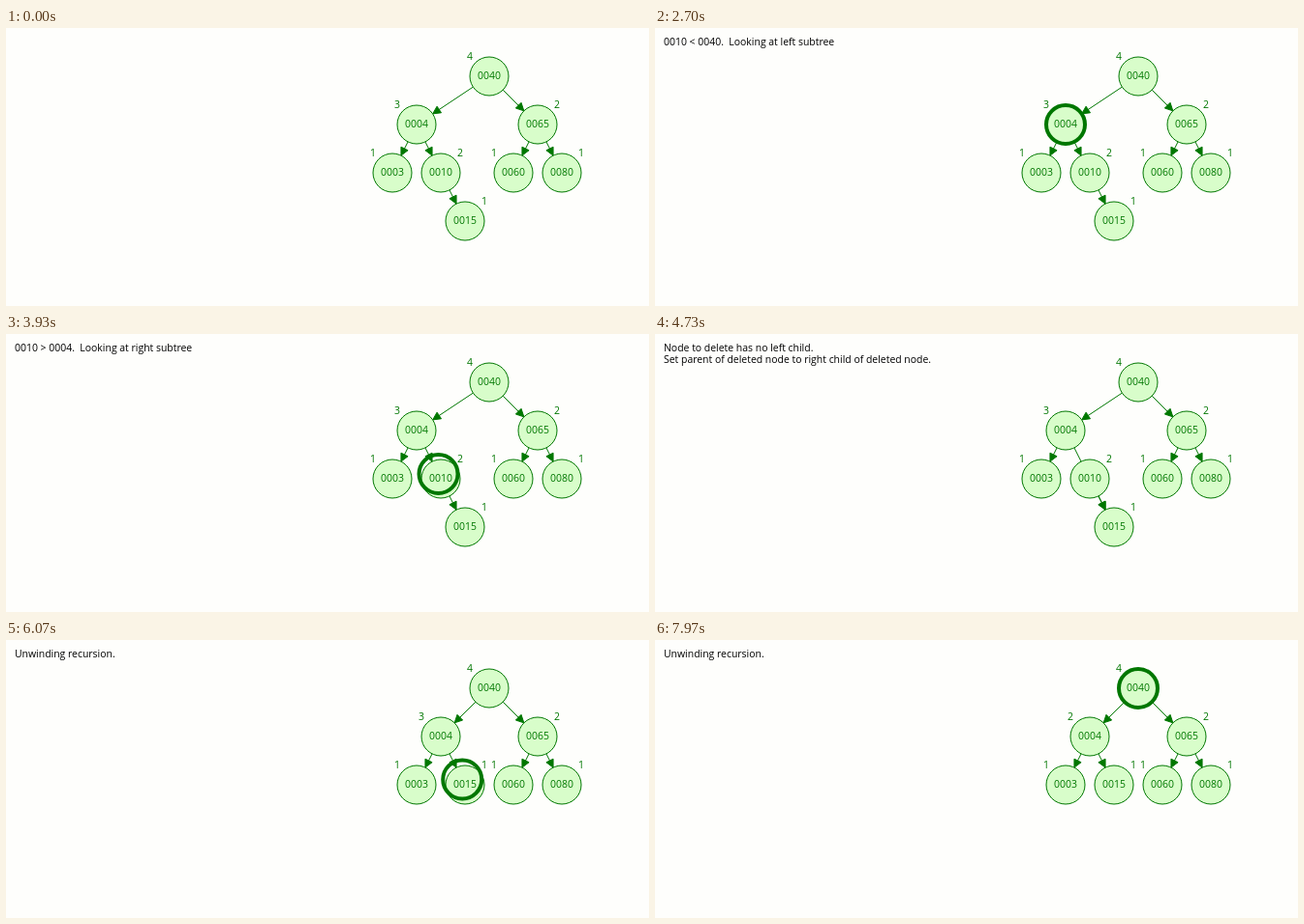
Recreate the animation shown at these times as an HTML page. Size 664x288 px, loop 8000 ms.

```html
<!DOCTYPE html>
<html lang="en">
<head>
<meta charset="utf-8">
<title>Tree deletion</title>
<style>
  html, body { margin: 0; width: 100%; height: 100%; overflow: hidden; background: #fefefc; }
  svg { display: block; width: 664px; height: 288px; }
  text { font: 10.45px "Open Sans", "Noto Sans", sans-serif; fill: #070; white-space: pre; }
  .mid { text-anchor: middle; }
  .msg { fill: #000; }
  .node { fill: #d8fdca; stroke: #070; }
  .edge { fill: #070; stroke: #070; }
  .ring { fill: none; stroke: #070; stroke-width: 4; }
</style>
</head>
<body>
<svg id="stage" viewBox="0 0 664 288"></svg>
<script>
const LOOP = 8000, STEP = 667, FRAME = 33, R = 20;
const stage = document.getElementById('stage');

const goLeft = '0010 < 0040.  Looking at left subtree';
const goRight = '0010 > 0004.  Looking at right subtree';
const relink = 'Node to delete has no left child.\nSet parent of deleted node to right child of deleted node.';

// Each step: start time, message, and an optional highlighted node or ring move.
const steps = [
  { at: 0, msg: '' },
  { at: 800, msg: 'Deleting 0010' },
  { at: 1430, msg: goLeft, mark: '0040' },
  { at: 2065, msg: goLeft, move: ['0040', '0004'] },
  { at: 2730, msg: goRight, mark: '0004' },
  { at: 3363, msg: goRight, move: ['0004', '0010'] },
  { at: 4010, msg: '0010 == 0010.  Found node to delete', mark: '0010' },
  { at: 4730, msg: relink },
  { at: 5367, msg: relink },
  { at: 6030, msg: 'Unwinding recursion.', move: ['0015', '0004'] },
  { at: 6700, msg: 'Adjusting height after recursive call' },
  { at: 7330, msg: 'Unwinding recursion.', move: ['0004', '0040'] }
];
const LINK = 7, SHIFT = 8, ADJUST = 10;

const esc = s => s.replace(/</g, '&lt;').replace(/>/g, '&gt;');
const lerp = (a, b, p) => a + (b - a) * p;
const text = (s, x, y, cls, style = '') =>
  `<text class="${cls}" x="${x}" y="${y}" style="${style}">${esc(s)}</text>`;
const circle = (x, y, r, attrs) => `<circle cx="${x}" cy="${y}" r="${r}" ${attrs}/>`;

function edge(a, b) {
  const len = Math.hypot(b.x - a.x, b.y - a.y);
  const dx = (b.x - a.x) / len, dy = (b.y - a.y) / len;
  const tx = b.x - dx * R, ty = b.y - dy * R;
  const bx = tx - dx * 8, by = ty - dy * 8;
  return `<path class="edge" d="M${a.x + dx * R} ${a.y + dy * R}L${tx} ${ty}` +
    `M${tx} ${ty}L${bx - dy * 4} ${by + dx * 4}L${bx + dy * 4} ${by - dx * 4}Z"/>`;
}

// Triangle wave between 3 and 8 px.
function pulse(t) {
  const phase = ((t - 937) / 233.3 + 20) % 10;
  return 3 + Math.abs(phase - 5);
}

function layout(k, p) {
  const s = k < SHIFT ? 0 : k > SHIFT ? 1 : p;
  const node = (x, y, side, height) => ({ x, y, side, height });
  const nodes = {
    '0040': node(499, 50, -1, 4),
    '0004': node(lerp(424, 449, s), 100, -1, k < ADJUST ? 3 : 2),
    '0065': node(549, 100, 1, 2),
    '0003': node(lerp(399, 424, s), 150, -1, 1),
    '0010': node(449, 150, 1, 2),
    '0060': node(524, 150, -1, 1),
    '0080': node(574, 150, 1, 1),
    '0015': node(474, lerp(200, 150, s), 1, 1)
  };
  const links = ['0040 0004', '0040 0065', '0004 0003', '0065 0060', '0065 0080'];
  links.push(k < LINK ? '0004 0010' : '0004 0015');
  if (k < SHIFT) links.push('0010 0015');
  else delete nodes['0010'];
  return { nodes, links };
}

function draw(t) {
  const k = steps.findLastIndex(s => t >= s.at);
  const step = steps[k];
  const p = Math.min(1, (t - step.at + FRAME) / STEP);
  const { nodes, links } = layout(k, p);
  let out = '';

  for (const link of links) {
    const [a, b] = link.split(' ');
    out += edge(nodes[a], nodes[b]);
  }
  for (const [name, n] of Object.entries(nodes)) {
    if (step.mark === name) out += circle(n.x, n.y, R + pulse(t), 'fill="#f00"');
    out += circle(n.x, n.y, R, 'class="node"') + text(name, n.x, n.y + 3, 'mid');
  }
  for (const [name, n] of Object.entries(nodes)) {
    const style = k === ADJUST && name === '0004' ? 'fill:#f00' : '';
    out += text(String(n.height), n.x + n.side * R, n.y - 17, 'mid', style);
  }
  if (step.move) {
    const [a, b] = step.move.map(name => nodes[name]);
    out += circle(lerp(a.x, b.x, p), lerp(a.y, b.y, p), R, 'class="ring"');
  }
  step.msg.split('\n').forEach((line, i) => {
    out += text(line, 9, 18 + i * 12, 'msg');
  });
  stage.innerHTML = out;
}

const start = performance.now();
function tick() {
  draw((performance.now() - start) % LOOP);
  requestAnimationFrame(tick);
}
tick();
</script>
</body>
</html>
```
